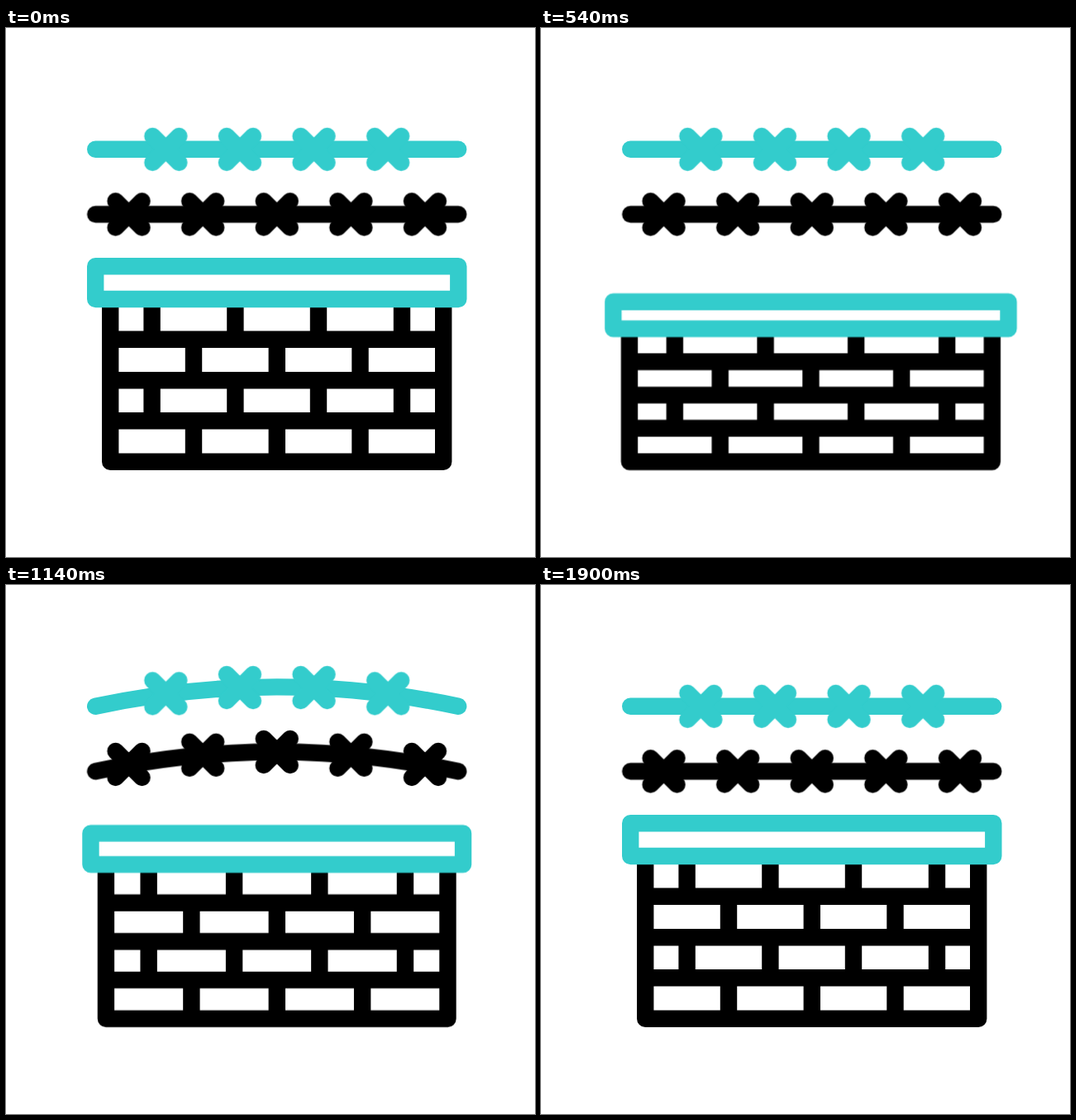
An HTML page without scripts for the animation above (2100 ms loop, 640 by 640 pixels).

```html
<!DOCTYPE html>
<html lang="en">
<head>
<meta charset="utf-8">
<title>Wall and barbed wire</title>
<style>
  html, body { margin: 0; width: 100%; height: 100%; overflow: hidden; background: #fff; }
  svg { display: block; width: 100vw; height: 100vh; }

  path, rect, use {
    fill: none;
    stroke-width: 20.4;
    stroke-linecap: round;
    stroke-linejoin: round;
  }
  .dark { stroke: #000; }
  .teal { stroke: #3cc; }

  .wall {
    transform-origin: 327.7px 524.7px;
    animation: squash 2100ms linear infinite;
  }
  .wall * { vector-effect: non-scaling-stroke; stroke-linecap: butt; }
  .wall rect { fill: #fff; }

  .line { animation: bow 2100ms linear infinite; }
  .barb { animation: lift 2100ms linear infinite; }

  /* Share of the bow's height at each barb */
  .k1 { --k: .36; }
  .k2 { --k: .66; }
  .k3 { --k: .84; }
  .k4 { --k: .97; }
  .k5 { --k: 1; }

  /* Slow crouch, spring up, small rebound */
  @keyframes squash {
    0%, 5% { transform: translate(0, 0) scale(1, 1); animation-timing-function: cubic-bezier(.3, .45, .6, .95); }
    9.524% { transform: translate(-.6px, 0) scale(1.065, .869); }
    25.714% { transform: translate(-1.3px, 0) scale(1.089, .818); }
    38.571% { transform: translate(-1.5px, 0) scale(1.108, .779); animation-timing-function: cubic-bezier(.4, .1, .75, .8); }
    44.762% { transform: translate(1.9px, 0) scale(.928, 1.062); animation-timing-function: ease-out; }
    46.667% { transform: translate(2.2px, 0) scale(.905, 1.095); animation-timing-function: ease-in-out; }
    52.857% { transform: translate(0, 0) scale(1.032, .936); }
    54.286% { transform: translate(0, 0) scale(1.0265, .948); }
    56.19% { transform: translate(0, 0) scale(1.013, .975); animation-timing-function: ease-out; }
    59.524%, 100% { transform: translate(0, 0) scale(1, 1); }
  }

  @keyframes bow {
    0%, 45.238% { d: path("M-219.5 0Q0 0 219.5 0"); animation-timing-function: ease-out; }
    48.81% { d: path("M-219.5 0Q0 -62 219.5 0"); animation-timing-function: cubic-bezier(.333, .667, .667, 1); }
    91.19%, 100% { d: path("M-219.5 0Q0 0 219.5 0"); }
  }

  @keyframes lift {
    0%, 45.238% { transform: translateY(0); animation-timing-function: ease-out; }
    48.81% { transform: translateY(calc(var(--k) * -31px)); animation-timing-function: cubic-bezier(.333, .667, .667, 1); }
    91.19%, 100% { transform: translateY(0); }
  }
</style>
</head>
<body>
<svg viewBox="0 0 640 640">
  <defs>
    <path id="x" d="M-16 -16L16 16M-16 16L16 -16"/>
  </defs>

  <g class="teal" transform="translate(327.7 146.8)">
    <path class="line" d="M-219.5 0Q0 0 219.5 0"/>
    <g class="barb k2"><use href="#x" x="-134.4"/><use href="#x" x="134.4"/></g>
    <g class="barb k4"><use href="#x" x="-44.8"/><use href="#x" x="44.8"/></g>
  </g>

  <g class="dark" transform="translate(327.7 225.4)">
    <path class="line" d="M-219.5 0Q0 0 219.5 0"/>
    <g class="barb k1"><use href="#x" x="-179.2"/><use href="#x" x="179.2"/></g>
    <g class="barb k3"><use href="#x" x="-89.6"/><use href="#x" x="89.6"/></g>
    <g class="barb k5"><use href="#x"/></g>
  </g>

  <g class="wall">
    <g class="dark">
      <path d="M126.2 328V524.7H529.2V328"/>
      <path d="M126.2 376.8H529.2M126.2 426.2H529.2M126.2 475.3H529.2"/>
      <path d="M176.6 328V376.8M277.4 328V376.8M378 328V376.8M479 328V376.8"/>
      <path d="M227 376.8V426.2M327.8 376.8V426.2M428.5 376.8V426.2"/>
      <path d="M176.6 426.2V475.3M277.4 426.2V475.3M378 426.2V475.3M479 426.2V475.3"/>
      <path d="M227 475.3V524.7M327.8 475.3V524.7M428.5 475.3V524.7"/>
    </g>
    <rect class="teal" x="108.2" y="288.2" width="439.1" height="39.8"/>
  </g>
</svg>
</body>
</html>
```
